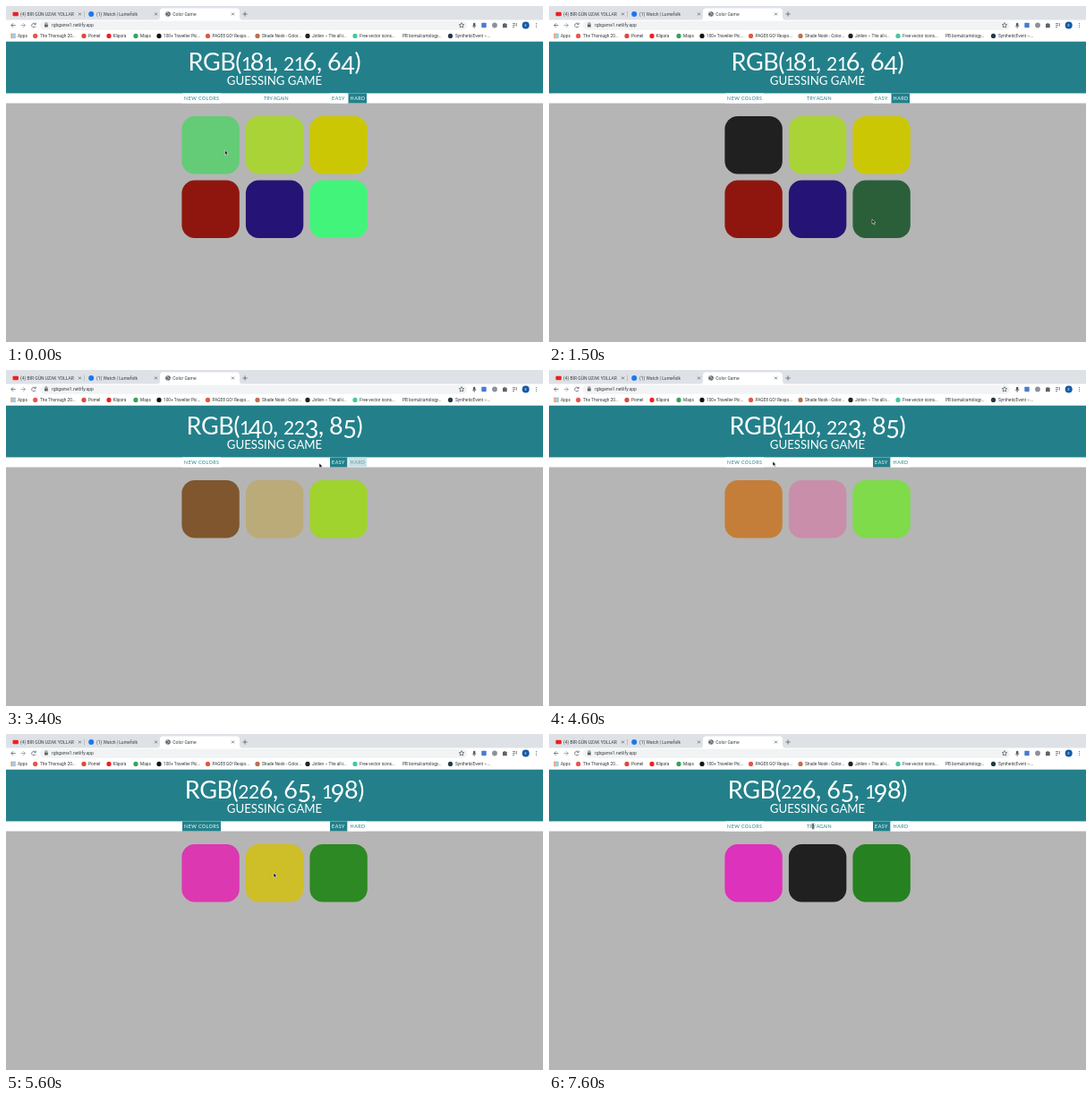
An HTML page that plays this animation: 600x375 px, repeating every 8000 ms.

```html
<!DOCTYPE html>
<html lang="en">
<head>
<meta charset="utf-8">
<title>Color Game</title>
<style>
  html, body { margin: 0; width: 100%; height: 100%; overflow: hidden; background: #b5b5b5; }
  svg { display: block; width: 600px; height: 375px; }
  text { white-space: pre; }
  .ui { font: 5px Roboto, "Noto Sans", sans-serif; fill: #3c4043; }
  .mark { font: 4.75px Roboto, "Noto Sans", sans-serif; fill: #303336; }
  .page { font-family: Lato, "Open Sans", sans-serif; }
  .title { font-size: 27px; letter-spacing: -.42px; fill: #fff; text-anchor: middle; }
  .sub { font-size: 13.2px; fill: #fff; text-anchor: middle; }
  .btn { font-size: 5.4px; letter-spacing: .42px; }
  .line { fill: none; stroke: #5f6368; stroke-width: .8; }
</style>
</head>
<body>
<svg id="stage" viewBox="0 0 600 375"></svg>
<script>
const LOOP = 8000, STEP = 100;
const TEAL = [35, 128, 138], WHITE = [255, 255, 255], DARK = [32, 32, 32];
const EASY_AT = 3200, NEW_AT = 5200, MISS_AT = 6200;
const stage = document.getElementById("stage");

function add(tag, attrs, text = "") {
  const el = document.createElementNS("http://www.w3.org/2000/svg", tag);
  for (const key in attrs) el.setAttribute(key, attrs[key]);
  el.textContent = text;
  return stage.appendChild(el);
}
const rgb = c => `rgb(${c.map(Math.round)})`;
const rect = (x, y, width, height, fill, rx = 0) => add("rect", { x, y, width, height, fill, rx });
const dot = (cx, cy, r, fill) => add("circle", { cx, cy, r, fill });
const path = (d, attrs = { class: "line" }) => add("path", { d, ...attrs });
const label = (x, y, cls, text) => add("text", { x, y, class: cls }, text);
const cross = x => path(`M${x - 1.4} 7.6l2.8 2.8m0-2.8l-2.8 2.8`);

function drawBrowser() {
  rect(0, 0, 600, 16, "#dee1e6");
  path("M168 16q4 0 4-4V6q0-3.5 3.5-3.5h82q3.5 0 3.5 3.5v6q0 4 4 4z", { fill: "#fff" });
  rect(0, 15.5, 600, 24.5, "#fff");
  rect(7.5, 6.7, 6.4, 4.6, "#f02020", 1);
  label(16, 10.8, "ui", "(4) BİR GÜN UZAK YOLLAR");
  cross(82.5);
  path("M87.5 5.5v7", { stroke: "#a0a4a8", "stroke-width": .5 });
  dot(95.2, 9, 3, "#1977f2");
  label(101, 10.8, "ui", "(1) Watch | Lumefolk");
  cross(167.5);
  dot(181, 9, 2.8, "#5f6368");
  path("M179.2 8q1.8-2 2 0t1.6 1.8m-2.8.2l.6 1.4", { fill: "none", stroke: "#fff", "stroke-width": .6 });
  label(186.3, 10.8, "ui", "Color Game");
  cross(253.5);
  path("M267 6.4v5.2m-2.6-2.6h5.2");

  rect(38, 16.7, 477, 10, "#f1f3f4", 5);
  path("M10.6 21.5H5.8m2.3-2.3l-2.3 2.3 2.3 2.3");
  path("M16.6 21.5h4.8m-2.3-2.3l2.3 2.3-2.3 2.3", { class: "line", opacity: .65 });
  path("M32.7 20a2.3 2.3 0 1 0 .5 2.3M33.3 18.6v1.9h-1.9");
  rect(43, 20.6, 3.8, 3, "#5f6368", .4);
  path("M43.8 20.6v-.8a1.1 1.1 0 0 1 2.2 0v.8", { class: "line" });
  label(51, 23.4, "ui", "rgbgame1.netlify.app");
  path("M509 18.7l.8 1.8 2 .2-1.5 1.3.5 2-1.8-1-1.8 1 .5-2-1.5-1.3 2-.2z", { class: "line", "stroke-width": .5 });
  rect(522, 18.7, 2.4, 4, "#55595d", 1.2);
  path("M521 22q2.2 3 4.4 0M523.2 23.5v1.4");
  rect(531.3, 18.8, 5.4, 5.4, "#4a7bd0", .8);
  dot(546, 21.5, 2.9, "#8e9298");
  path("M555 19.8h1.5q.8-2 1.6 0h1.6v4.4H555z", { fill: "#5f6368" });
  path("M566 19.6h3m-3 2h3m-3 2h2M570.3 19v3.7");
  dot(580.7, 21.5, 4, "#1459a8");
  add("text", { x: 580.7, y: 23, fill: "#fff", "font-size": 4, "text-anchor": "middle", "font-family": "Roboto, sans-serif" }, "E");
  for (const y of [19.5, 21.5, 23.5]) dot(592.5, y, .6, "#5f6368");

  const colors = ["#ea4335", "#34a853", "#4285f4"];
  for (let i = 0; i < 9; i++) rect(5.5 + i % 3 * 1.9, 30.8 + (i / 3 | 0) * 1.9, 1.3, 1.3, colors[i % 3]);
  const marks = [
    [13, "Apps"],
    [38, "The Thorough 20...", 32.7, "#e8554e"],
    [92, "Pomel", 87, "#dd4b3e"],
    [119.5, "Klipora", 115, "#f02020"],
    [150, "Maps", 145, "#35a35b"],
    [176, "100+ Traveller Pic...", 171, "#111"],
    [230.5, "PAGE8 GO! Respo...", 225.5, "#e4583c"],
    [286, "Shade Nook - Color...", 281, "#bd704d"],
    [342, "Jotlen – The all-i...", 337, "#222"],
    [395, "Free vector icons...", 390, "#43c9a0"],
    [443, "PB"],
    [450, "bomulcartology..."],
    [502, "SyntheticEvent –...", 496.5, "#243b45"]
  ];
  for (const [x, text, icon, fill] of marks) {
    label(x, 35.1, "mark", text);
    if (icon) dot(icon, 33.4, 2.6, fill);
  }
}

drawBrowser();
rect(0, 39.7, 600, 58, rgb(TEAL));
rect(0, 97.5, 600, 11, "#fff");
const title = label(300, 71.5, "page title", "");
label(300, 88.3, "page sub", "GUESSING GAME");
const message = add("text", { x: 288, y: 105, class: "page", "font-size": 5.4, fill: rgb(TEAL) }, "TRY AGAIN");

// Tracks are lists of [time, value]; each value fades in from the one before.
const buttons = [
  [197, 43, "NEW COLORS", [[-999, 0], [4800, 1], [5600, 0]]],
  [362, 19.3, "EASY", [[-999, 0], [2800, 1]]],
  [382.5, 20.5, "HARD", [[-999, 1], [3260, 0]]]
].map(([x, w, text, track]) => ({
  box: rect(x, 97.5, w, 11, "#fff"),
  text: label(x + 2.1, 105, "page btn", text),
  track
}));

const squares = [
  [[-999, [100, 203, 118]], [0, DARK], [EASY_AT, [197, 126, 57]], [NEW_AT, [221, 50, 187]]],
  [[-999, [169, 211, 54]], [EASY_AT, [200, 142, 170]], [NEW_AT, [207, 194, 28]], [MISS_AT, DARK]],
  [[-999, [204, 199, 5]], [EASY_AT, [127, 219, 74]], [NEW_AT, [38, 130, 32]]],
  [[-999, [143, 22, 15]]],
  [[-999, [37, 20, 117]]],
  [[-999, [66, 245, 122]], [1250, DARK]]
].map((track, i) => ({
  el: rect(196.4 + i % 3 * 71.5, 123 + (i / 3 | 0) * 71.5, 64.4, 64.4, "#000", 14.5),
  lower: i > 2,
  track
}));

const arrow = path("M0 0v5.2l1.2-1.1.9 2 1-.4-.9-2h1.7z", { fill: "#111", stroke: "#fff", "stroke-width": .5 });
const beam = path("M-1.3-3q1.3 0 1.3 1V2q0 1-1.3 1M1.3-3Q0-3 0-2V2q0 1 1.3 1", { fill: "none", stroke: "#222", "stroke-width": .7 });
const route = [
  [0, 244.5, 161], [500, 244.5, 161], [900, 258, 171], [1200, 361, 238],
  [1800, 361, 238], [2200, 367, 150], [2300, 367, 150], [2600, 372, 114],
  [2800, 371, 102], [3200, 371, 102], [3400, 350, 104], [4100, 300, 109],
  [4600, 250, 102], [4800, 222, 102], [5300, 222, 102], [5600, 299, 155],
  [6300, 299, 155], [6800, 377, 102], [7600, 295, 103], [LOOP, 295, 103]
];

// The CSS "ease" curve: cubic-bezier(.25, .1, .25, 1).
function ease(x) {
  if (x <= 0) return 0;
  if (x >= 1) return 1;
  let lo = 0, hi = 1, s = .5;
  for (let i = 0; i < 16; i++) {
    s = (lo + hi) / 2;
    if (.75 * s * (1 - s) + s ** 3 < x) lo = s; else hi = s;
  }
  return .3 * s * (1 - s) ** 2 + 3 * s * s * (1 - s) + s ** 3;
}
const mix = (a, b, k) => a + (b - a) * k;
const blend = (a, b, k) => a.map((v, i) => mix(v, b[i], k));

function fade(track, t, length, join) {
  return track.slice(1).reduce((value, [start, next]) =>
    t < start ? value : join(value, next, ease((t - start) / length)), track[0][1]);
}

function pointer(t) {
  const i = route.findIndex(p => p[0] > t);
  const [a, b] = [route[i - 1], route[i]];
  const k = (t - a[0]) / (b[0] - a[0]);
  const s = k * k * (3 - 2 * k);
  return [mix(a[1], b[1], s), mix(a[2], b[2], s)];
}

// Old-style figures: 0–2 are small, 3, 4, 5, 7 and 9 hang below the line.
function setTitle(text) {
  if (title.dataset.value === text) return;
  title.dataset.value = text;
  let drop = 0;
  title.innerHTML = [...text].map(ch => {
    const low = /[34579]/.test(ch) ? 4 : 0;
    const size = /[012]/.test(ch) ? 21 : 27;
    const gap = ch === "1" ? -2.4 : -.42;
    const span = `<tspan dy="${low - drop}" font-size="${size}" style="letter-spacing:${gap}px">${ch}</tspan>`;
    drop = low;
    return span;
  }).join("");
}

function draw(t) {
  setTitle(t < EASY_AT ? "RGB(181, 216, 64)" : t < NEW_AT ? "RGB(140, 223, 85)" : "RGB(226, 65, 198)");
  message.style.display = t < EASY_AT || t >= MISS_AT ? "" : "none";
  for (const b of buttons) {
    const on = fade(b.track, t, 300, mix);
    b.box.setAttribute("fill", rgb(blend(WHITE, TEAL, on)));
    b.text.setAttribute("fill", rgb(blend(TEAL, WHITE, on)));
  }
  for (const s of squares) {
    s.el.setAttribute("fill", rgb(fade(s.track, t, 600, blend)));
    s.el.style.display = s.lower && t >= EASY_AT ? "none" : "";
  }
  const [x, y] = pointer(t);
  const overText = t > MISS_AT && x > 287 && x < 316 && y > 98 && y < 108;
  arrow.style.display = overText ? "none" : "";
  beam.style.display = overText ? "" : "none";
  for (const el of [arrow, beam]) el.setAttribute("transform", `translate(${x} ${y})`);
}

const begin = performance.now();
function tick() {
  const t = (performance.now() - begin) % LOOP;
  draw(Math.floor(t / STEP) * STEP);
  requestAnimationFrame(tick);
}
tick();
</script>
</body>
</html>
```
